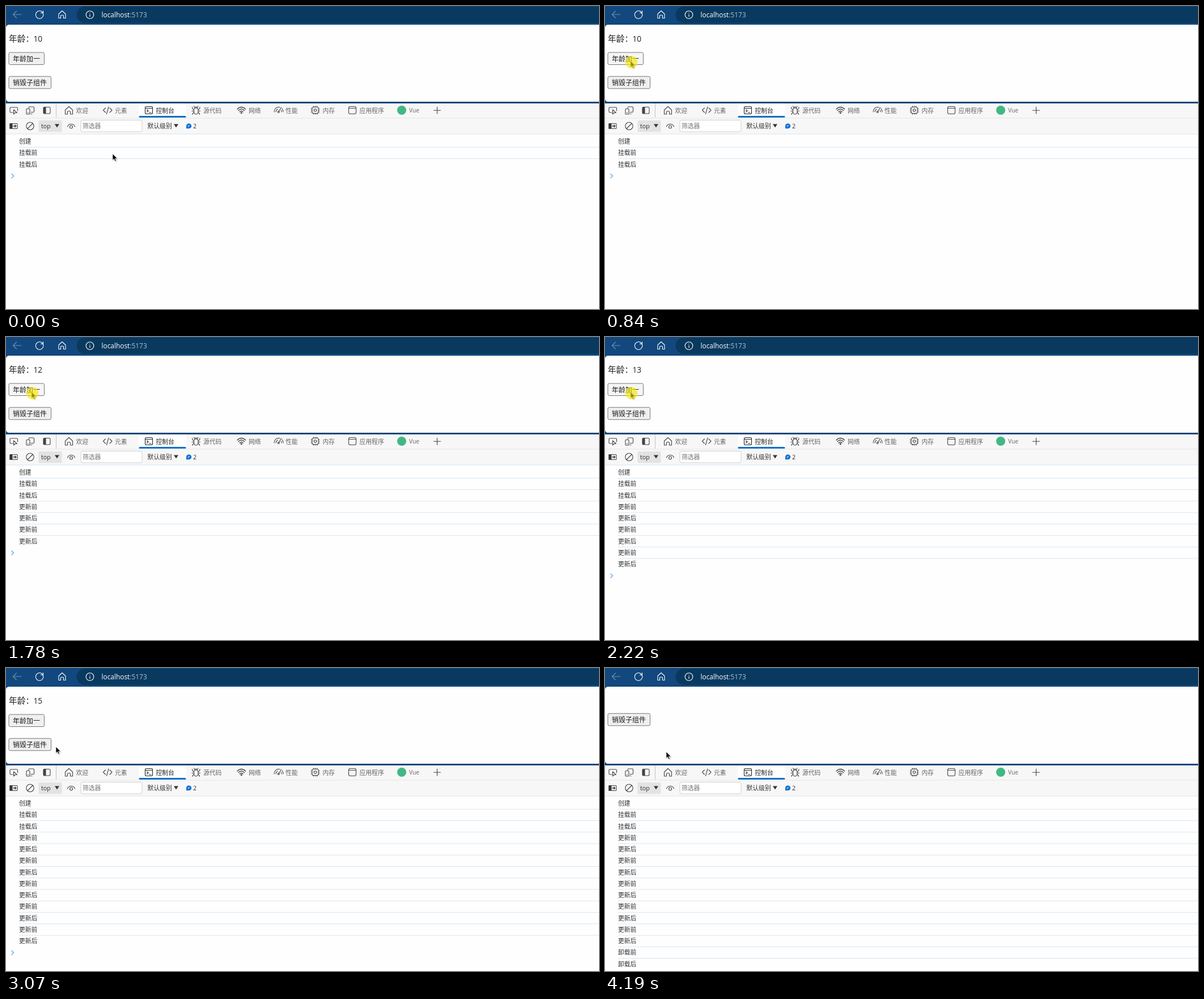
An HTML page that plays this animation: 1046 px wide and 535 px high, repeating every 4210 ms.

```html
<!DOCTYPE html>
<html lang="zh-CN">
<head>
<meta charset="utf-8">
<style>
html, body { margin: 0; width: 100%; height: 100%; overflow: hidden; background: #fefefe; }
svg { display: block; font: 10.8px "Open Sans", "Noto Sans CJK SC", "Noto Sans CJK", sans-serif; fill: #333; }
.icon { fill: none; stroke: #444; stroke-width: 1.1; stroke-linecap: round; stroke-linejoin: round; }
.nav { stroke: #fff; }
.page { font-size: 12px; fill: #1c1c1c; }
.button { stroke: #767676; }
.tabs { fill: #666; }
.rule { stroke: #d8e5f2; }
#cursor { filter: drop-shadow(1px 1px 1px #0004); }
</style>
</head>
<body>
<svg width="1046" height="535" viewBox="0 0 1046 535">
  <!-- browser bar -->
  <rect width="1046" height="172" fill="#12487d"/>
  <path d="M1046 1H139a14.5 14.5 0 0 0 0 29H1046Z" fill="#0a395f"/>
  <g class="icon nav">
    <path d="M27 15H12.500M18.500 9L12.500 15L18.500 21" stroke="#7090b0" style="stroke:#7090b0"/>
    <path d="M65.500 13A6.800 6.800 0 1 1 62.500 9.500L65 12M65.500 8.500V12.300H61.500"/>
    <path d="M93 14L99 8.500L105 14V21.500H101.500V17.500Q101.500 16 99 16T96.500 17.500V21.500H93Z"/>
    <circle cx="148" cy="15.500" r="6.800"/>
    <path d="M148 15V18.500M148 12.300V12.500"/>
  </g>
  <text x="168.500" y="20" font-size="11.900" fill="#fff">localhost<tspan fill="#a9bfd2">:5173</tspan></text>

  <!-- page -->
  <rect y="33" width="1052" height="136" rx="6" fill="#fefefe"/>
  <path d="M0 45V39Q0 33 6 33H1046V169H6Q0 169 0 163Z" fill="#fefefe"/>
  <g class="page">
    <g id="child">
      <text x="5" y="62.500" font-size="14.700">年龄：</text>
      <text id="age" x="48.500" y="62.500" font-size="13.700"></text>
      <rect id="add" class="button" x="5" y="82" width="62.500" height="21.500" rx="2.500"/>
      <text x="12" y="97.500">年龄加一</text>
    </g>
    <g id="toggle">
      <rect id="destroy" class="button" x="5" y="124.300" width="74.500" height="21.500" rx="2.500"/>
      <text x="12" y="139.800">销毁子组件</text>
    </g>
  </g>

  <!-- developer tools -->
  <rect y="172" width="1046" height="363" fill="#fefefe"/>
  <rect y="172" width="1046" height="54" fill="#f7f7f7"/>
  <path d="M0 198H1046" stroke="#e6e6e6"/>
  <path d="M88.500 172V197" stroke="#c4c4c4"/>
  <path d="M0 226H1046" class="rule"/>
  <rect x="234.500" y="172" width="83.500" height="25" fill="#fff"/>
  <rect x="234.500" y="194" width="83" height="3" rx="1.500" fill="#0a6fc9"/>
  <g class="icon">
    <path d="M12 188H8.500Q7 188 7 186.500V180.500Q7 179 8.500 179H19Q20.500 179 20.500 180.500V185M13.500 183V191L16 188.500H19.500Z"/>
    <path d="M40 180V179.500Q40 178 41.500 178H48Q49.500 178 49.500 179.500V186Q49.500 187.500 48 187.500H44M46 190.500H44M37 181.500H41Q42 181.500 42 182.500V190Q42 191 41 191H37Q36 191 36 190V182.500Q36 181.500 37 181.500M38.500 188.500H39.500"/>
    <rect x="66" y="178.500" width="12" height="11.500" rx="2"/>
    <path d="M66.500 179H70V189.500H66.500Z" fill="#444"/>
    <path d="M104.500 183.500L111 177.500L117.500 183.500V191H113.500V187Q113.500 185.500 111 185.500T108.500 187V191H104.500Z"/>
    <path d="M175.500 180L171.500 184L175.500 188M183 180L187 184L183 188M181 178L177.500 190.500"/>
    <g stroke="#222" style="stroke:#222">
      <rect x="245.500" y="177.500" width="13" height="13" rx="2"/>
      <path d="M245.500 180.500H258.500M248.500 183L251 185L248.500 187.300M252.500 188H256"/>
    </g>
    <rect x="331.500" y="180" width="7.500" height="11" rx="3.700"/>
    <path d="M332.500 181Q335.200 175 338 181M331.500 177L333 179M339 177L337.500 179M331.500 183Q328.500 182.500 328.500 178.500M339 183Q342 182.500 342 178.500M331.500 185.500H328M339 185.500H342.500M332 188Q329 188.500 329 191.500M338.500 188Q341.500 188.500 341.500 191.500"/>
    <path d="M408 182Q415.200 175 422.500 182M410 184.500Q415.200 179.500 420.500 184.500M412.200 187Q415.200 184 418.200 187" stroke-width="1.400"/>
    <circle cx="415.200" cy="188.800" r="1" fill="#444"/>
    <path d="M473 187Q474 178.500 481 178.500L483 178.700M487 181Q488.700 183.500 489 187M476 187Q476.500 183.500 479 182M485.500 184L486 187M481 187L485.500 179"/>
    <circle cx="480.700" cy="187" r="1.500"/>
    <rect x="540" y="178.500" width="11" height="11" rx="2"/>
    <circle cx="545.500" cy="184" r="2.200"/>
    <path d="M542.500 178V176.800M545.500 178V176.800M548.500 178V176.800M542.500 190V191.300M545.500 190V191.300M548.500 190V191.300M539.500 181H538.200M539.500 184H538.200M539.500 187H538.200M551.500 181H553M551.500 184H553M551.500 187H553"/>
    <rect x="604.500" y="177.500" width="13" height="13" rx="2.500"/>
    <path d="M604.500 180.500H617.500M754.500 184.200H766.500M760.500 178.200V190.200"/>
    <rect x="7" y="207.500" width="13" height="9" rx="1"/>
    <path d="M7 207.500H11V216.500H7Z" fill="#333"/>
    <path d="M13 212H17.500M15.800 210L17.800 212L15.800 214" stroke-width="1.400"/>
    <circle cx="42.500" cy="212" r="6.700"/>
    <path d="M38 216.500L47 207.500"/>
    <path d="M108.500 213Q110 208.500 115 208.500T121.500 213"/>
    <circle cx="115" cy="213.500" r="2.500"/>
  </g>
  <circle cx="698" cy="184" r="8" fill="#41b883"/>
  <g class="tabs">
    <text x="123.500" y="188.500">欢迎</text>
    <text x="192" y="188.500">元素</text>
    <text x="264.500" y="188.500" fill="#222">控制台</text>
    <text x="348" y="188.500">源代码</text>
    <text x="428" y="188.500">网络</text>
    <text x="493" y="188.500">性能</text>
    <text x="558.500" y="188.500">内存</text>
    <text x="623.500" y="188.500">应用程序</text>
    <text x="711" y="188.300" font-size="10.300">Vue</text>
  </g>
  <rect x="57.500" y="202" width="41" height="20.500" rx="2" fill="#e3e3e3"/>
  <text x="62" y="216">top</text>
  <path d="M86 208.500H94L90 214.500ZM296 208.500H304L300 214.500Z"/>
  <rect x="132" y="201.500" width="108" height="20.500" rx="3" fill="#fff" stroke="#d0d0d0"/>
  <text x="135" y="216" fill="#757575">筛选器</text>
  <text x="249.500" y="216">默认级别</text>
  <path d="M318 216.200V212A4.600 4.400 0 1 1 322.500 216.200Z" fill="#0b6cd4"/>
  <path d="M320.500 211H324.500M320.500 213H323" stroke="#fff" stroke-width=".8"/>
  <text x="330" y="216">2</text>
  <g id="log"></g>
  <path id="prompt" d="M9.500 -4L13.500 0L9.500 4" fill="none" stroke="#4c9be0" stroke-width="1.200"/>

  <path id="cursor" d="M0 0V11.300L2.600 8.900L4.400 13L6.300 12.200L4.500 8.200H8.200Z" fill="#000" stroke="#fff" stroke-width=".7"/>
  <circle id="halo" r="10.800" fill="#f5e600" opacity=".62"/>
</svg>
<script>
const LOOP = 4210, ROW = 20.25;
const $ = id => document.getElementById(id);
const show = (el, on) => el.style.display = on ? '' : 'none';

// pointer way points: time, x, y
const path = [
  [0, 188, 261], [180, 125, 190], [360, 51, 104], [405, 51, 104], [450, 46, 98],
  [495, 45, 97], [2880, 45, 97], [3060, 88, 139], [3240, 70, 141], [3400, 60, 136],
  [4095, 60, 136], [4140, 84, 142], [4185, 108, 148]
];
// press, effect and release times
const clicks = [
  [760, 850, 890], [1310, 1360, 1410], [1780, 1880, 1880],
  [2220, 2320, 2320], [2660, 2790, 2790], [3770, 3820, 3860]
];

const labels = ['创建', '挂载前', '挂载后'];
for (let i = 0; i < 5; i++) labels.push('更新前', '更新后');
labels.push('卸载前', '卸载后');
$('log').innerHTML = labels.map((label, i) => {
  const y = i * ROW;
  const rule = i ? `<path class="rule" d="M23 ${229 + y}H1046"/>` : '';
  return `<g>${rule}<text x="23" y="${243 + y}">${label}</text></g>`;
}).join('');
const rows = [...$('log').children];

function pointerAt(time) {
  const t = Math.floor(time / 45) * 45; // the pointer is sampled in steps
  const i = path.findIndex(p => p[0] > t);
  if (i < 0) return path.at(-1).slice(1);
  const [t0, x0, y0] = path[i - 1], [t1, x1, y1] = path[i];
  const k = (t - t0) / (t1 - t0);
  return [x0 + (x1 - x0) * k, y0 + (y1 - y0) * k];
}

function draw(t) {
  const done = clicks.filter(c => t >= c[1]).length;
  const pressed = clicks.some(c => t >= c[0] && t < c[2]);
  const gone = done > 5;
  const count = 3 + done * 2;
  const [x, y] = pointerAt(t);
  const shade = (top, right) =>
    x < 5 || x > right || y < top || y > top + 21.5 ? '#efefef' : pressed ? '#f5f5f5' : '#e5e5e5';

  show($('child'), !gone);
  $('age').textContent = 10 + Math.min(done, 5);
  $('toggle').setAttribute('transform', `translate(0 ${gone ? -44 : 0})`);
  $('add').setAttribute('fill', shade(82, 67));
  $('destroy').setAttribute('fill', shade(gone ? 80.3 : 124.3, 79));
  rows.forEach((row, i) => show(row, i < count));
  $('prompt').setAttribute('transform', `translate(0 ${239.3 + count * ROW})`);
  $('cursor').setAttribute('transform', `translate(${x} ${y})`);
  $('halo').setAttribute('transform', `translate(${x + 1.5} ${y + 2})`);
  show($('halo'), pressed);
}

const start = performance.now();
function tick() {
  draw((performance.now() - start) % LOOP);
  requestAnimationFrame(tick);
}
tick();
</script>
</body>
</html>
```
